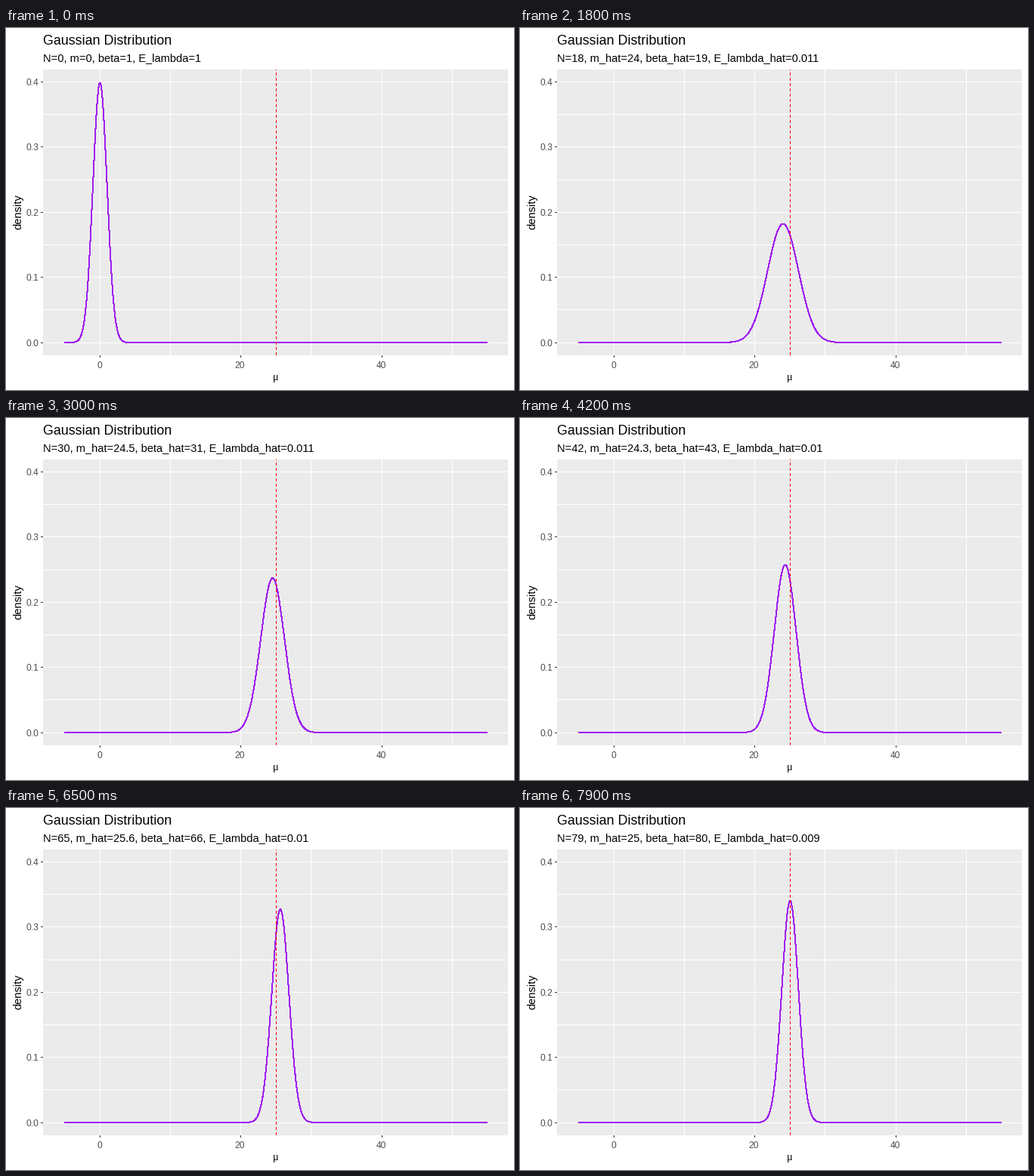
A matplotlib script for the animation above (8000 ms loop, 672 px wide and 480 px high).

```python
import numpy as np
import matplotlib.pyplot as plt
from matplotlib.animation import FuncAnimation
from matplotlib.patches import Rectangle

W, H, DPI = 672, 480, 100
PX = 72 / DPI  # one pixel in points
FRAMES, INTERVAL = 80, 100
LEFT, RIGHT, TOP, BOTTOM = 49, 664, 55, 434
TRUE_MU = 25

# Waypoints of the posterior: observations, mean, expected precision
N, MEAN, LAMBDA = zip((0, 0, 1), (1, 16.5, .0055), (9, 24.2, .01),
                      (18, 24, .011), (30, 24.5, .0114), (42, 24.3, .0097),
                      (54, 25.8, .0094), (65, 25.6, .0102), (79, 25, .0091))


def px_x(mu):
    return 124.3 + 9.32 * mu


def px_y(density):
    return 417.05 - 863.7 * density


def cell(v):
    """Centre of the pixel that holds v."""
    return np.floor(v) + 0.5


fig = plt.figure(figsize=(W / DPI, H / DPI), dpi=DPI, facecolor="white")
ax = fig.add_axes([0, 0, 1, 1])
ax.set_xlim(0, W)
ax.set_ylim(H, 0)
ax.axis("off")


def line(xs, ys, color, z=2, **kw):
    return ax.plot(xs, ys, color=color, lw=PX, antialiased=False, snap=False,
                   solid_capstyle="butt", zorder=z, **kw)[0]


def label(x, y, s, size, color="black", font="Liberation Sans", **kw):
    kw.setdefault("va", "baseline")
    return ax.text(x, y, s, fontsize=size * PX, color=color, family=font, **kw)


ax.add_patch(Rectangle((LEFT, TOP), RIGHT - LEFT, BOTTOM - TOP,
                       fc="#EBEBEB", ec="none", lw=0, zorder=0))

for i in range(9):
    y = cell(px_y(i * 0.05))
    line([LEFT, RIGHT], [y, y], "white", z=1)
    if i % 2 == 0:
        line([46, LEFT], [y, y], "#333333")
        label(43.5, y + 4.2, f"{i * 0.05:.1f}", 12, "#4D4D4D", ha="right")

for mu in range(0, 60, 10):
    x = cell(px_x(mu))
    line([x, x], [TOP, BOTTOM], "white", z=1)
    if mu % 20 == 0:
        line([x, x], [BOTTOM, BOTTOM + 3], "#333333")
        label(x - 0.9, 451, str(mu), 12, "#4D4D4D", ha="center")

label(LEFT, 22, "Gaussian Distribution", 17.85)
subtitle = label(LEFT, 44, "", 14.6)
label(357, 466.5, "\u03bc", 14.67, font="Liberation Serif", ha="center")
label(23, 243.5, "density", 14.67, rotation=90, ha="right", va="center")

grid = np.linspace(TRUE_MU - 30, TRUE_MU + 30, 1000)
curve = line(px_x(grid), np.full(grid.size, px_y(0)), "#A020F0", z=3)
x = cell(px_x(TRUE_MU))
line([x, x], [BOTTOM, TOP], "red", z=4,
     linestyle=(0, (4, 4)), dash_capstyle="butt")


def update(n):
    m = np.interp(n, N, MEAN)
    lam = np.interp(n, N, LAMBDA)
    beta = n + 1
    prec = beta * lam
    pdf = np.sqrt(prec / (2 * np.pi)) * np.exp(-prec * (grid - m) ** 2 / 2)
    curve.set_ydata(px_y(pdf))
    hat = "_hat" if n else ""
    subtitle.set_text(f"N={n}, m{hat}={round(m, 1):g}, beta{hat}={beta}, "
                      f"E_lambda{hat}={round(lam, 3):g}")
    return curve, subtitle


anim = FuncAnimation(fig, update, frames=FRAMES, interval=INTERVAL,
                     repeat=True, repeat_delay=0)
plt.show()
```
